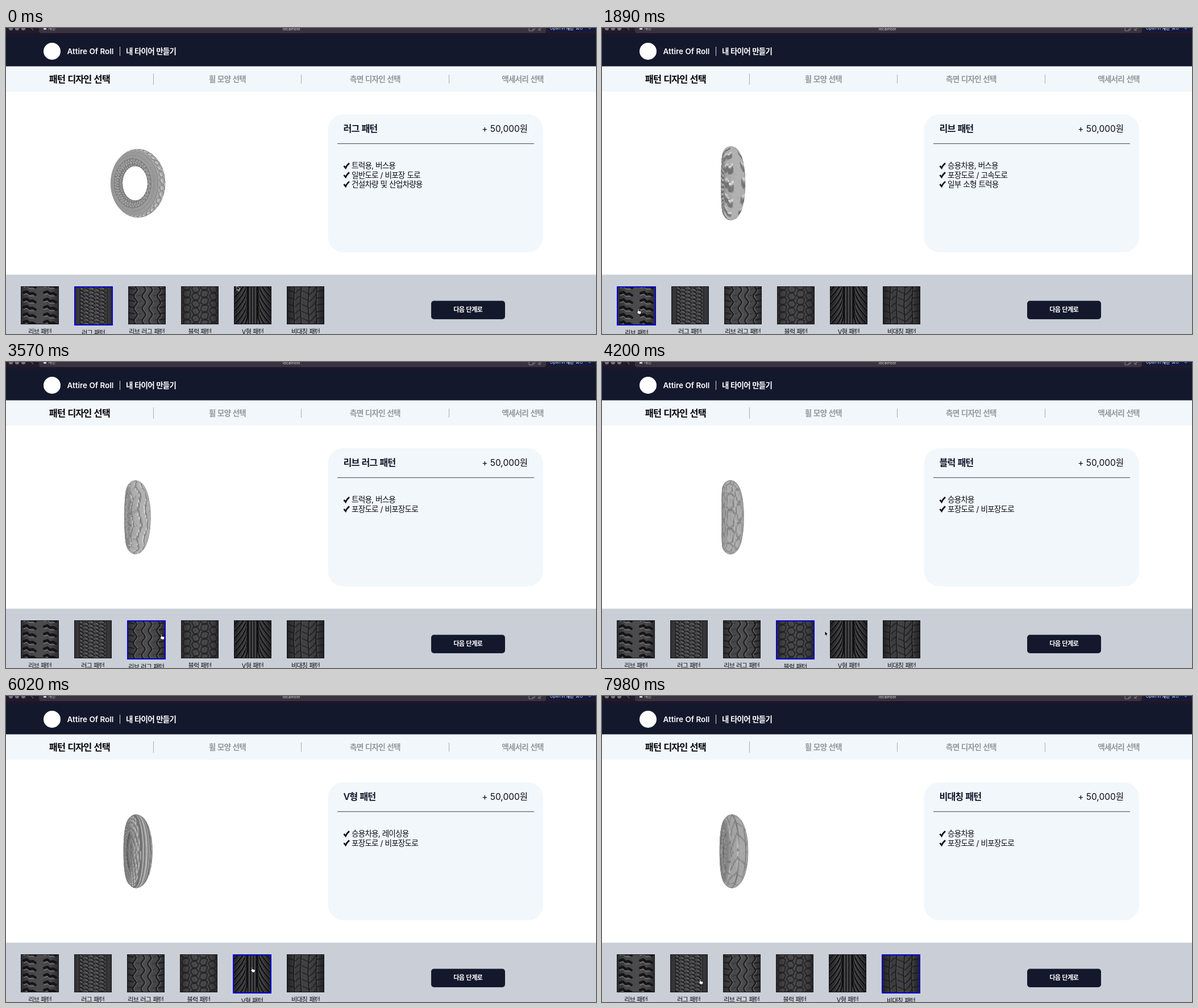
These frames come from a looping animation (1038x539 px, 8 s). An HTML page with a canvas:

```html
<!DOCTYPE html>
<html lang="ko">
<head>
<meta charset="utf-8">
<title>타이어 만들기</title>
<style>
html, body { margin: 0; width: 100%; height: 100%; overflow: hidden; background: #fff; }
body { position: relative; font-family: Inter, "Noto Sans CJK KR", "Noto Sans CJK", sans-serif; }
svg, canvas, .tile { position: absolute; left: 0; top: 0; }
text { font-family: Inter, "Noto Sans CJK KR", "Noto Sans CJK", sans-serif; }
.ko { letter-spacing: -.06em; word-spacing: .06em; }
.b { font-weight: 600; }
.mid { text-anchor: middle; }
.tile { top: 455px; width: 66.5px; font-size: 11px; color: #0c0d12; text-align: center; }
.tile canvas { position: static; display: block; width: 64.5px; height: 64.5px; border: 1px solid #15151a; }
.tile span { display: block; margin-top: 5.5px; line-height: 16px; white-space: nowrap; letter-spacing: -.06em; word-spacing: .06em; }
.tile.on { width: 68.5px; }
.tile.on canvas { border: 2px solid #0505d2; }
#tire { left: 142px; top: 193px; }
</style>
</head>
<body>
<svg width="1038" height="539" viewBox="0 0 1038 539">
  <rect width="1038" height="14" fill="#1e1529"/>
  <rect width="1038" height="9" fill="#211a2a"/>
  <rect x="58" y="-8" width="892" height="17" rx="4" fill="#39323f"/>
  <rect x="955" y="-8" width="80" height="15" rx="3" fill="#111a42"/>
  <g fill="#77717d"><circle cx="8.500" cy=".5" r="3.700"/><circle cx="19.500" cy=".5" r="3.700"/><circle cx="30.500" cy=".5" r="3.700"/></g>
  <g fill="none" stroke="#8f8995"><path d="M48-3 45 .5 48 4M920 0V5H927V1M923-2H930V3H927"/><path d="M938 3 943-1M937 1V4H941M1024-1 1027 2 1030-1"/></g>
  <rect x="66" y="-1" width="5" height="4" fill="#c9c6cc"/>
  <g font-size="7.200" fill="#dedbe1">
    <text x="74" y="3">개인</text>
    <text x="502" y="3.500" class="mid">localhost</text>
    <text x="957" y="3.300">Open in <tspan class="b">개인</tspan></text>
    <text x="1002" y="3.300">⌘O</text>
  </g>
  <rect y="13" width="1038" height="55" fill="#14182c"/>
  <circle cx="81" cy="41" r="15" fill="#fff"/>
  <g font-size="13.500" fill="#fff" class="b">
    <text x="107.500" y="45.700">Attire Of Roll</text>
    <text x="211" y="45.700" class="ko">내 타이어 만들기</text>
  </g>
  <path d="M200.500 33V49" stroke="#d8d9dd"/>
  <rect y="67.500" width="1038" height="44.500" fill="#f1f7fb"/>
  <path d="M259.500 80V100M519.500 82V98M779.500 82V98" stroke="#a9adb1"/>
  <text x="129.300" y="95.800" font-size="16.400" class="mid ko b" fill="#050507">패턴 디자인 선택</text>
  <g font-size="13.600" class="mid ko b" fill="#93979b">
    <text x="389.300" y="95">휠 모양 선택</text>
    <text x="649.300" y="95">측면 디자인 선택</text>
    <text x="909" y="95">액세서리 선택</text>
  </g>
  <rect x="566.500" y="152" width="378.500" height="243" rx="27" fill="#f1f7fb"/>
  <path d="M583 203.700H929" stroke="#40444c"/>
  <text id="title" x="593.500" y="183.300" font-size="16.200" class="ko b" fill="#12172b"></text>
  <text x="918" y="183.300" font-size="15.500" text-anchor="end" fill="#0b0d14">+ 50,000원</text>
  <g id="list" font-size="13.600" fill="#0b0d14"></g>
  <rect y="434.500" width="1038" height="105" fill="#cacfd7"/>
  <rect x="748" y="480.500" width="130" height="32.500" rx="5" fill="#14182c"/>
  <text x="812.700" y="500.300" font-size="11.200" class="mid ko b" fill="#fff">다음 단계로</text>
</svg>
<canvas id="tire" width="170" height="160"></canvas>
<div id="tiles"></div>
<svg id="cursor" width="14" height="16" viewBox="-2 -2 14 16">
  <path id="arrow" d="M0 0V8.300L2 6.500 3.400 9.600 4.700 9 3.300 6H6Z" fill="#08080a" stroke="#fff" stroke-width=".7"/>
  <path id="hand" d="M1.500 1C1.500-.2 3.200-.2 3.200 1V4L7 4.800Q8.200 5.200 8 6.500L7.200 10H3L.2 6.600Q-.2 5.400 1 5.600L1.500 6Z" fill="#fff" stroke="#111" stroke-width=".9"/>
</svg>
<script>
const $ = id => document.getElementById(id);
const LOOP = 8000, STEP = 70, TAU = Math.PI * 2, SIZE = 65;

const kinds = [
  ['리브 패턴', '승용차용, 버스용', '포장도로 / 고속도로', '일부 소형 트럭용'],
  ['러그 패턴', '트럭용, 버스용', '일반도로 / 비포장 도로', '건설차량 및 산업차량용'],
  ['리브 러그 패턴', '트럭용, 버스용', '포장도로 / 비포장도로'],
  ['블럭 패턴', '승용차용', '포장도로 / 비포장도로'],
  ['V형 패턴', '승용차용, 레이싱용', '포장도로 / 비포장도로'],
  ['비대칭 패턴', '승용차용', '포장도로 / 비포장도로']
];

// start time, kind, start angle, degrees per second
const picks = [
  [0, 1, 60, 34], [1680, 0, 2.5, 34], [2480, 1, 2.5, 34], [3290, 2, 2.5, 34],
  [4060, 3, 2.5, 34], [5600, 4, 2.5, 30], [7630, 5, 2.5, 35]
];

// time, x, y of the pointer tip
const path = [
  [0, 406, 454], [210, 460, 482], [840, 120, 506], [1200, 61, 494], [1890, 61, 494],
  [2300, 150, 488], [2520, 156, 486], [2900, 225, 477], [3360, 226, 477],
  [3850, 340, 482], [4060, 346, 481], [4200, 392, 474], [4600, 416, 475], [5250, 418, 475],
  [5880, 420, 476], [6600, 526, 486], [6800, 526, 486], [7200, 535, 493],
  [7490, 527, 488], [7630, 525, 489], [7980, 170, 498]
];

// Tread drawings
const treads = [
  line => {
    for (let y = -6; y < 72; y += 13) {
      for (const x of [2, 38]) {
        line('#141417', 4, [x + 2, y + 3], [x + 8, y + 1], [x + 12, y + 5], [x + 18, y + 4], [x + 23, y + 7]);
        line('#98989b', .8, [x + 2, y + 7], [x + 8, y + 5], [x + 12, y + 9], [x + 20, y + 9]);
      }
      line('#48484b', 1, [30, y], [33, y + 4], [31, y + 9], [34, y + 13]);
    }
  },
  line => {
    for (let i = 0; i < 5; i++) for (let y = -8; y < 72; y += 6.5) {
      const x = 9 + i * 9.5, h = i % 2 * 3;
      line('#19191c', 1.5, [x, y + h], [x + 7, y + h + 4], [x + 4, y + h + 6.5]);
      line('#8b8b8e', .9, [x + 1, y + h + 2.5], [x + 5, y + h + 5]);
    }
    for (const x of [8, 57]) line('#232326', 1.5, [x, 0], [x, 65]);
  },
  line => {
    for (const x of [12, 27, 39, 54]) {
      const pts = [];
      for (let y = -2; y < 68; y += 2) pts.push([x + 3 * Math.sin(y / 21.7 * TAU), y]);
      line('#18181b', 2.2, ...pts);
      line('#8a8a8d', .8, ...pts.map(([a, b]) => [a + 2, b]));
    }
    for (let y = 2; y < 70; y += 10.85) {
      line('#1c1c1f', 2, [0, y], [10, y + 2]);
      line('#1c1c1f', 2, [55, y + 2], [65, y]);
      line('#2b2b2e', 1, [16, y + 3], [22, y + 1]);
      line('#2b2b2e', 1, [44, y + 3], [50, y + 1]);
    }
  },
  line => {
    line('#352b2a', 4, [1, 0], [1, 65]);
    for (let i = 0; i < 6; i++) for (let j = 0; j < 4; j++) {
      const x = 2 + j * 16, y = i * 13 - 6 + (j % 2) * 5, d = j % 2 ? 2 : -2;
      line('#1f1f22', 1.6, [x + 2, y], [x + 10, y - 1], [x + 14, y + 3 + d], [x + 12, y + 10],
        [x + 4, y + 11], [x, y + 6 - d], [x + 2, y]);
      line('#39393c', .8, [x + 7, y + 3], [x + 6, y + 8]);
    }
  },
  line => {
    for (const x of [25, 30, 35, 40]) {
      line('#111114', 2, [x, 0], [x, 65]);
      line('#6c6c6f', .6, [x + 1.8, 0], [x + 1.8, 65]);
    }
    for (let y = -20; y < 70; y += 12) for (const s of [-1, 1]) {
      const p = [0, 1, 2, 3, 4, 5].map(k => [32.5 + s * (9 + k * k), y - 18 + 9 * k]);
      line('#0e0e11', 2.4, ...p);
      line('#707073', .7, ...p.map(([a, b]) => [a + s * 2, b]));
    }
  },
  line => {
    for (const x of [12, 24, 38, 52]) {
      line('#121215', 1.6, [x + 1, 0], [x - 1, 32], [x + 1, 65]);
      line('#737376', .6, [x + 2.5, 0], [x + .5, 32], [x + 2.5, 65]);
    }
    for (let y = -6; y < 75; y += 12) {
      line('#1a1a1d', 1.4, [0, y], [11, y + 3]);
      line('#1a1a1d', 1.2, [14, y + 5], [19, y], [24, y - 2]);
      line('#1a1a1d', 1.2, [26, y + 1], [38, y + 6]);
      line('#1a1a1d', 1.4, [39, y + 8], [46, y + 2], [52, y - 6]);
      line('#1a1a1d', 1.4, [53, y + 2], [65, y]);
    }
  }
];
const base = [72, 74, 72, 72, 60, 62];

const tiles = kinds.map((k, i) => {
  const box = document.createElement('div');
  box.className = 'tile';
  box.innerHTML = `<canvas width="${SIZE}" height="${SIZE}"></canvas><span>${k[0]}</span>`;
  $('tiles').append(box);
  const c = box.firstChild.getContext('2d', { willReadFrequently: true });
  const g = c.createLinearGradient(0, 0, SIZE, 0);
  const grey = v => `rgb(${v},${v},${v + 2})`;
  g.addColorStop(0, grey(base[i] - 28));
  g.addColorStop(.2, grey(base[i] - 3));
  g.addColorStop(.5, grey(base[i] + 4));
  g.addColorStop(.8, grey(base[i] - 3));
  g.addColorStop(1, grey(base[i] - 28));
  c.fillStyle = g;
  c.fillRect(0, 0, SIZE, SIZE);
  c.lineJoin = c.lineCap = 'round';
  treads[i]((color, width, ...pts) => {
    c.beginPath();
    pts.forEach(p => c.lineTo(...p));
    c.strokeStyle = color;
    c.lineWidth = width;
    c.stroke();
  });
  return { box, tex: c.getImageData(0, 0, SIZE, SIZE).data };
});

// Torus in perspective, turning about its vertical axis
const ctx = $('tire').getContext('2d');
const R = 38.5, r = 11.5, D = 105, TALL = 1.14, N = 240, M = 60;

function drawTire(kind, deg) {
  const a = deg * TAU / 360, s = Math.sin(a), c = Math.cos(a), tex = tiles[kind].tex;
  const turn = (h, n) => [h * s - n * c, h * c + n * s];
  const project = (i, j) => {
    const p = i / N * TAU, q = j / M * TAU, rho = R + r * Math.cos(q);
    const [x, z] = turn(rho * Math.cos(p), r * Math.sin(q));
    const f = D / (D - z);
    return [81 + x * f, 80.5 - rho * Math.sin(p) * f * TALL];
  };
  const quads = [];
  for (let i = 0; i < N; i++) for (let j = 0; j < M; j++) {
    const p = (i + .5) / N * TAU, q = (j + .5) / M * TAU;
    const cq = Math.cos(q), rho = R + r * cq;
    const [x, z] = turn(rho * Math.cos(p), r * Math.sin(q));
    const [nx, nz] = turn(cq * Math.cos(p), Math.sin(q));
    const y = rho * Math.sin(p);
    if (nz * (D - z) - nx * x - cq * Math.sin(p) * y < -4) continue;
    const u = (2 * q / TAU + .5) % 1 * SIZE | 0, v = (4 * p / TAU) % 1 * SIZE | 0;
    const t = tex[(v * SIZE + u) * 4];
    const g = 92 + 1.1 * t - (cq < -.3 ? 14 : 0) - (cq < -.8 ? 12 : 0);
    quads.push([z, i, j, g | 0]);
  }
  quads.sort((m, n) => m[0] - n[0]);
  ctx.clearRect(0, 0, 170, 160);
  ctx.lineWidth = .4;
  for (const [, i, j, g] of quads) {
    ctx.fillStyle = ctx.strokeStyle = `rgb(${g},${g},${g})`;
    ctx.beginPath();
    ctx.moveTo(...project(i, j));
    ctx.lineTo(...project(i + 1, j));
    ctx.lineTo(...project(i + 1, j + 1));
    ctx.lineTo(...project(i, j + 1));
    ctx.closePath();
    ctx.fill();
    ctx.stroke();
  }
}

const tileX = (i, sel) => 26.4 + 93.1 * i + (i > sel ? 2 : 0);

function select(sel) {
  const [title, ...rows] = kinds[sel];
  $('title').textContent = title;
  $('list').innerHTML = rows.map((row, i) => {
    const y = 247.3 + i * 16.2;
    return `<path d="M594.500 ${y - 4.5}l3 3.800q2.500-5.500 6.500-8.500" fill="none" stroke="#0b0d14" stroke-width="2.700"/>
      <text x="608" y="${y}" class="ko">${row}</text>`;
  }).join('');
  tiles.forEach(({ box }, i) => {
    box.classList.toggle('on', i === sel);
    box.style.left = tileX(i, sel) + 'px';
  });
}

function movePointer(t, sel) {
  let k = path.findIndex(p => p[0] > t);
  if (k < 0) k = path.length - 1;
  const [t0, x0, y0] = path[k - 1], [t1, x1, y1] = path[k];
  const f = Math.min(1, (t - t0) / (t1 - t0)), e = f * f * (3 - 2 * f);
  const x = x0 + (x1 - x0) * e, y = y0 + (y1 - y0) * e;
  const over = y > 455 && y < 522 &&
    kinds.some((_, i) => x > tileX(i, sel) && x < tileX(i, sel) + 67);
  $('hand').style.display = over ? '' : 'none';
  $('arrow').style.display = over ? 'none' : '';
  $('cursor').style.transform = `translate(${x - 2}px,${y - 2}px)`;
}

let lastT = -1, lastSel = -1;
function frame() {
  const t = Math.floor(performance.now() % LOOP / STEP) * STEP;
  if (t !== lastT) {
    lastT = t;
    const [start, sel, angle, rate] = picks.filter(p => p[0] <= t).pop();
    if (sel !== lastSel) select(lastSel = sel);
    drawTire(sel, angle + rate * (t - start) / 1000);
    movePointer(t, sel);
  }
  requestAnimationFrame(frame);
}
frame();
</script>
</body>
</html>
```
